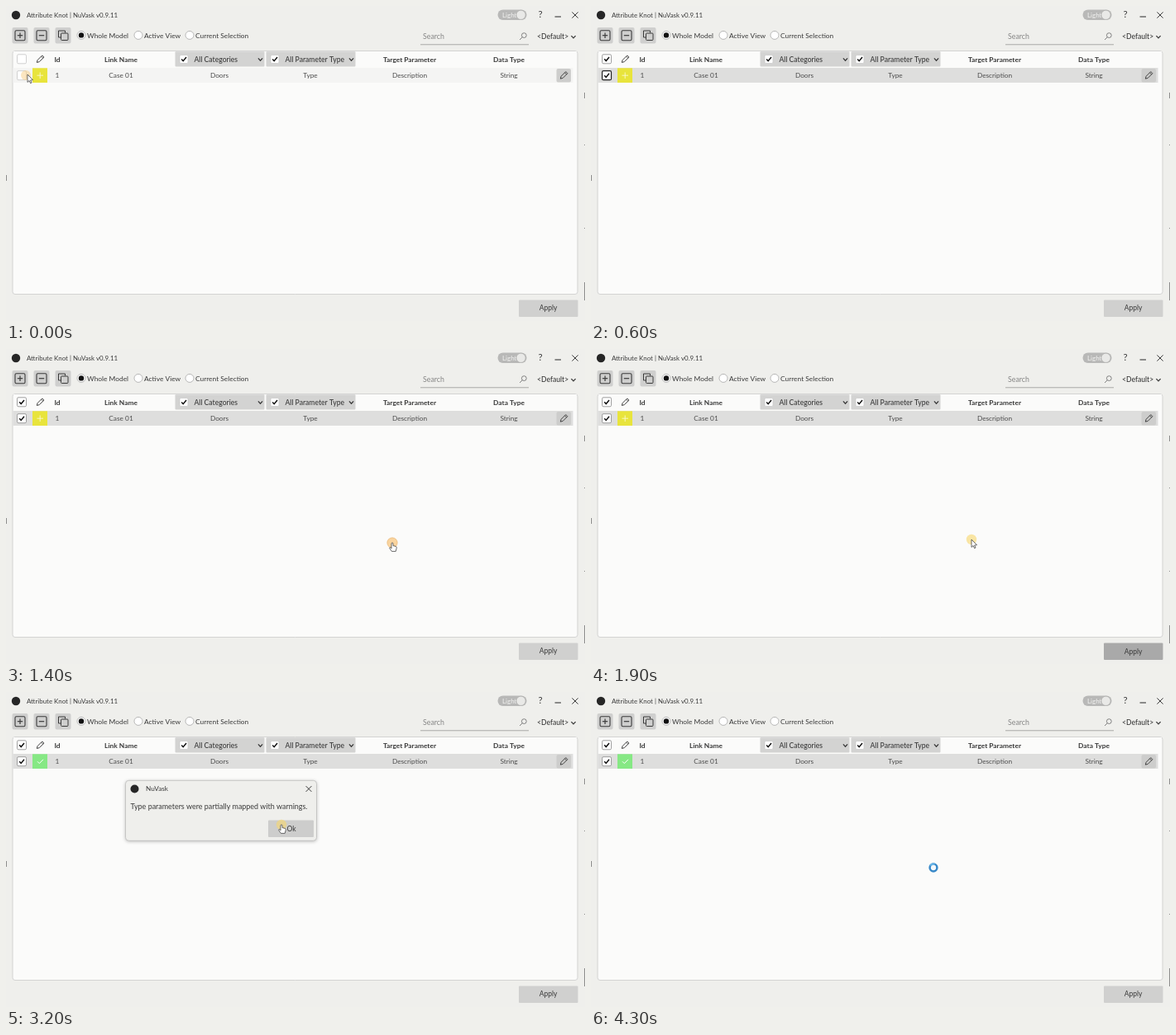
Animation of 700 by 382 pixels, one loop 5400 ms. Source, as an HTML page with a canvas:

```html
<!DOCTYPE html>
<html lang="en">
<head>
<meta charset="utf-8">
<title>Attribute Knot</title>
<style>
html, body { margin: 0; width: 100%; height: 100%; overflow: hidden; background: #efefec; }
canvas { display: block; width: 700px; height: 382px; }
</style>
</head>
<body>
<canvas id="stage"></canvas>
<script>
const W = 700, H = 382, LOOP = 5400, STEP = 100;
const INK = '#3a3a3a', BTN = '#d0d0cf';
const canvas = document.getElementById('stage');
const g = canvas.getContext('2d');
const dpr = window.devicePixelRatio || 1;
canvas.width = W * dpr;
canvas.height = H * dpr;

// Pointer stops: time, x, y, shape ('' hides it)
const stops = [
  [0, 26, 83, 'arrow'], [100, 27, 84, 'arrow'], [200, 120, 106, 'arrow'],
  [300, 312, 170, 'arrow'], [400, 482, 266, 'arrow'], [500, 568, 325, 'arrow'],
  [600, 0, 0, ''], [900, 640, 374, 'arrow'], [1000, 648, 369, 'hand'],
  [1200, 618, 346, 'hand'], [1300, 530, 280, 'hand'], [1400, 467, 235, 'hand'],
  [1500, 461, 231, 'hand'], [1800, 460, 231, 'arrow'],
  [2300, 440, 220, 'arrow'], [2400, 372, 184, 'arrow'], [2500, 332, 163, 'hand'],
  [3200, 333, 161, 'hand'], [3300, 350, 172, 'hand'], [3400, 384, 192, 'arrow'],
  [3500, 407, 207, 'arrow'], [3600, 414, 213, 'arrow'], [4300, 414, 213, 'busy']
];
const applyFill = [[0, BTN], [1800, '#b9b9b9'], [1900, '#a9a9a9'], [2100, '#c1c1c1'], [2700, BTN]];

const latest = (list, t) => list.filter(s => s[0] <= t).pop();

function box(x, y, w, h, fill, stroke, r = 0, lw = 1) {
  g.beginPath();
  g.roundRect(x, y, w, h, r);
  if (fill) { g.fillStyle = fill; g.fill(); }
  if (stroke) { g.strokeStyle = stroke; g.lineWidth = lw; g.stroke(); }
}

function disc(x, y, r, fill, stroke, lw = 1) {
  g.beginPath();
  g.arc(x, y, r, 0, Math.PI * 2);
  if (fill) { g.fillStyle = fill; g.fill(); }
  if (stroke) { g.strokeStyle = stroke; g.lineWidth = lw; g.stroke(); }
}

function line(pts, color = INK, lw = 1) {
  g.beginPath();
  for (let i = 0; i < pts.length; i += 2) g.lineTo(pts[i], pts[i + 1]);
  g.strokeStyle = color;
  g.lineWidth = lw;
  g.stroke();
}

function text(s, x, y, { size = 8.5, weight = 400, align = 'left', color = INK } = {}) {
  g.font = `${weight} ${size}px Lato, "Open Sans", sans-serif`;
  g.textAlign = align;
  g.textBaseline = 'alphabetic';
  g.fillStyle = color;
  g.fillText(s, x, y + 3);
}

function cross(x, y, r) {
  line([x - r, y - r, x + r, y + r]);
  line([x + r, y - r, x - r, y + r]);
}

function chevron(x, y) {
  line([x - 2.6, y - 1.4, x, y + 1.4, x + 2.6, y - 1.4], INK, 1.3);
}

function checkbox(x, y, r, on, stroke, lw = 1) {
  box(x - r, y - r, r * 2, r * 2, '#fff', stroke, 1.5, lw);
  if (on) line([x - 2.8, y, x - 0.8, y + 2.2, x + 3, y - 2.4], '#111', 1.5);
}

function pencil(x, y) {
  g.save();
  g.translate(x, y);
  g.rotate(Math.PI / 4);
  line([-1.5, 3, -1.5, -5, 1.5, -5, 1.5, 3, 0, 5.6, -1.5, 3], INK, 0.9);
  line([-1.5, -3.3, 1.5, -3.3], INK, 0.8);
  g.restore();
}

function toolButton(x, icon) {
  box(x - 9.5, 26, 19, 19.5, '#cfcfce', null, 2);
  if (icon === 'copy') {
    line([x - 2.5, 38, x - 5.5, 38, x - 5.5, 30, x + 2.5, 30, x + 2.5, 32.5], INK, 1);
    box(x - 2.5, 33, 8.5, 8.5, null, INK, 1, 1);
    return;
  }
  box(x - 6, 29.7, 12, 12, null, INK, 1.5, 1.1);
  line([x - 3.2, 35.7, x + 3.2, 35.7], INK, 1.2);
  if (icon === 'add') line([x, 32.5, x, 38.9], INK, 1.2);
}

function radio(x, label, on) {
  disc(x, 35.4, 5, '#fff', '#a8a8a7', 0.8);
  if (on) disc(x, 35.4, 3.2, '#111');
  text(label, x + 7, 35.5, { size: 8.4 });
}

function combo(x, w, label) {
  box(x, 55.2, w, 18.3, '#d3d3d2', null, 1);
  checkbox(x + 10.5, 64.5, 5, true, '#c8c8c8', 0.7);
  text(label, x + 23, 64.7, { weight: 500, size: 8.6 });
  chevron(x + w - 5, 64.8);
}

function drawShell() {
  g.fillStyle = '#efefec';
  g.fillRect(0, 0, W, H);
  for (const [x, y, h] of [[699, 335, 22], [699, 105, 7], [699, 168, 1], [699, 269, 1], [0, 205, 7]]) {
    g.fillStyle = '#8d8d8c';
    g.fillRect(x, y, 1, h);
  }

  disc(12, 11, 5.2, '#262626');
  text('Attribute Knot | NuVask v0.9.11', 25, 10.7, { size: 7.9 });
  box(594.5, 4.5, 35, 12.5, '#b8b8b7', null, 6.2);
  text('Light', 600, 10.7, { size: 8, color: '#f4f4f3' });
  disc(622.5, 10.8, 5.6, '#e9e9e7', '#a9a9a8', 0.6);
  text('?', 646, 11.2, { size: 11.5, align: 'center' });
  line([663.5, 13, 671, 13], INK, 1.1);
  cross(688, 11, 3.6);

  toolButton(17, 'add');
  toolButton(43, 'remove');
  toolButton(69, 'copy');
  radio(91, 'Whole Model', true);
  radio(160, 'Active View', false);
  radio(222, 'Current Selection', false);

  text('Search', 504, 37, { size: 8.8, color: '#858585' });
  line([501, 46.8, 632, 46.8], '#a0a09f', 0.9);
  disc(626.3, 35.6, 2.9, null, '#666', 0.8);
  line([624.2, 37.8, 621, 41], '#666', 0.8);
  text('<Default>', 642, 37.3, { weight: 500, size: 8.6 });
  chevron(686, 37.5);
}

function drawTable(t) {
  const checked = t >= 100, done = t >= 2300;
  const edge = checked ? '#8a8a8a' : '#c6c6c6';
  box(8, 54.5, 683, 295, '#fbfbfa', '#d0d0ce', 3, 0.9);
  box(9, 55, 681, 19.5, '#fbfbfa');
  box(8.5, 75, 677, 18, checked ? '#dededd' : '#f4f4f3');

  checkbox(19, 64.3, 5.5, checked, edge, 0.8);
  pencil(41.3, 64.5);
  const head = { weight: 700, size: 8.4, align: 'center' };
  text('Id', 62, 64.7, head);
  text('Link Name', 139, 64.7, head);
  combo(204.5, 108, 'All Categories');
  combo(314.5, 108, 'All Parameter Type');
  text('Target Parameter', 488, 64.7, head);
  text('Data Type', 608, 64.7, head);

  const focus = checked && t < 900;
  checkbox(19, 84.2, 5.5, checked, focus ? '#222' : edge, focus ? 1.2 : 0.8);
  box(32, 75.3, 18, 17.7, done ? '#86e884' : '#e8e43c');
  if (done) line([38, 84.3, 40.3, 86.6, 45, 81.8], '#fff', 1);
  else {
    line([37.5, 84.2, 45, 84.2], '#fbfad0', 0.9);
    line([41.2, 80.5, 41.2, 88], '#fbfad0', 0.9);
  }
  const cells = [['1', 62], ['Case 01', 139], ['Doors', 258], ['Type', 368], ['Description', 488], ['String', 608]];
  for (const [s, x] of cells) text(s, x, 84.2, { size: 8.3, align: 'center', color: '#4c4c4c' });
  box(665.5, 76, 17.5, 16.5, '#cdcdcc', null, 2);
  pencil(674.3, 84.2);
}

function drawApply(t) {
  box(620, 356.5, 71.5, 20.5, latest(applyFill, t)[1], null, 1);
  const shift = t >= 1500 && t < 2300 ? 0.6 : 0;
  text('Apply', 655.5, 366.3 + shift, { align: 'center' });
}

function drawDialog(t) {
  g.save();
  g.shadowColor = 'rgba(0,0,0,.28)';
  g.shadowBlur = 4 * dpr;
  g.shadowOffsetY = dpr;
  box(144.5, 107.3, 231, 73, '#efefec', null, 4);
  g.restore();
  box(144.5, 107.3, 231, 73, null, '#c2c2c1', 4, 0.9);
  disc(155.5, 117.5, 5, '#262626');
  text('NuVask', 169, 117.3, { size: 8.2 });
  cross(366, 117.5, 3.4);
  text('Type parameters were partially mapped with warnings.', 150.5, 139.3, { size: 8.95 });
  box(317, 155.5, 55, 20.5, t >= 3900 ? '#bcbcbb' : '#cdcdcc', null, 1);
  text('Ok', 345, 165.7, { align: 'center', size: 8.6 });
}

function arrow() {
  g.beginPath();
  for (const [x, y] of [[0, 0], [0, 9.4], [2.1, 7.5], [3.6, 10.7], [5, 10], [3.6, 7], [6.5, 6.7]]) g.lineTo(x, y);
  g.closePath();
}

function hand() {
  g.beginPath();
  g.moveTo(-1, 0.6);
  g.quadraticCurveTo(0, -1, 1, 0.6);
  g.lineTo(1, 3.6);
  g.lineTo(4.4, 4.4);
  g.quadraticCurveTo(5.4, 4.8, 5.2, 6.4);
  g.lineTo(4.2, 10.4);
  g.lineTo(-0.6, 10.4);
  g.lineTo(-3.4, 6.4);
  g.quadraticCurveTo(-3.2, 5, -1.9, 5.8);
  g.lineTo(-1, 6.8);
  g.closePath();
}

function drawPointer(t) {
  const [, x, y, shape] = latest(stops, t);
  if (!shape) return;
  if (shape === 'busy') {
    disc(x, y, 4.4, '#f4f8fb', '#3788c8', 2.5);
    g.beginPath();
    g.arc(x, y, 4.4, -2.6, -1.2);
    g.strokeStyle = '#69b4e6';
    g.stroke();
    return;
  }
  const click = t === 1400;
  if (t === 0) disc(x - 2, y + 1, 6, 'rgba(250,205,130,.5)');
  else disc(x, y, 6.2, click ? 'rgba(247,190,110,.65)' : 'rgba(247,214,110,.62)', click ? 'rgba(225,165,90,.6)' : null, 0.8);
  g.save();
  g.translate(x, y);
  if (shape === 'hand') hand(); else arrow();
  g.fillStyle = '#fff';
  g.fill();
  g.strokeStyle = '#444';
  g.lineWidth = 0.8;
  g.lineJoin = 'round';
  g.stroke();
  g.restore();
}

function frame(now) {
  const t = Math.floor((now % LOOP) / STEP) * STEP;
  g.setTransform(dpr, 0, 0, dpr, 0, 0);
  drawShell();
  drawTable(t);
  drawApply(t);
  if (t >= 2700 && t < 4100) drawDialog(t);
  drawPointer(t);
}

let start = null;
function tick(now) {
  if (start === null) start = now;
  frame(now - start);
  requestAnimationFrame(tick);
}
frame(0);
requestAnimationFrame(tick);
</script>
</body>
</html>
```
